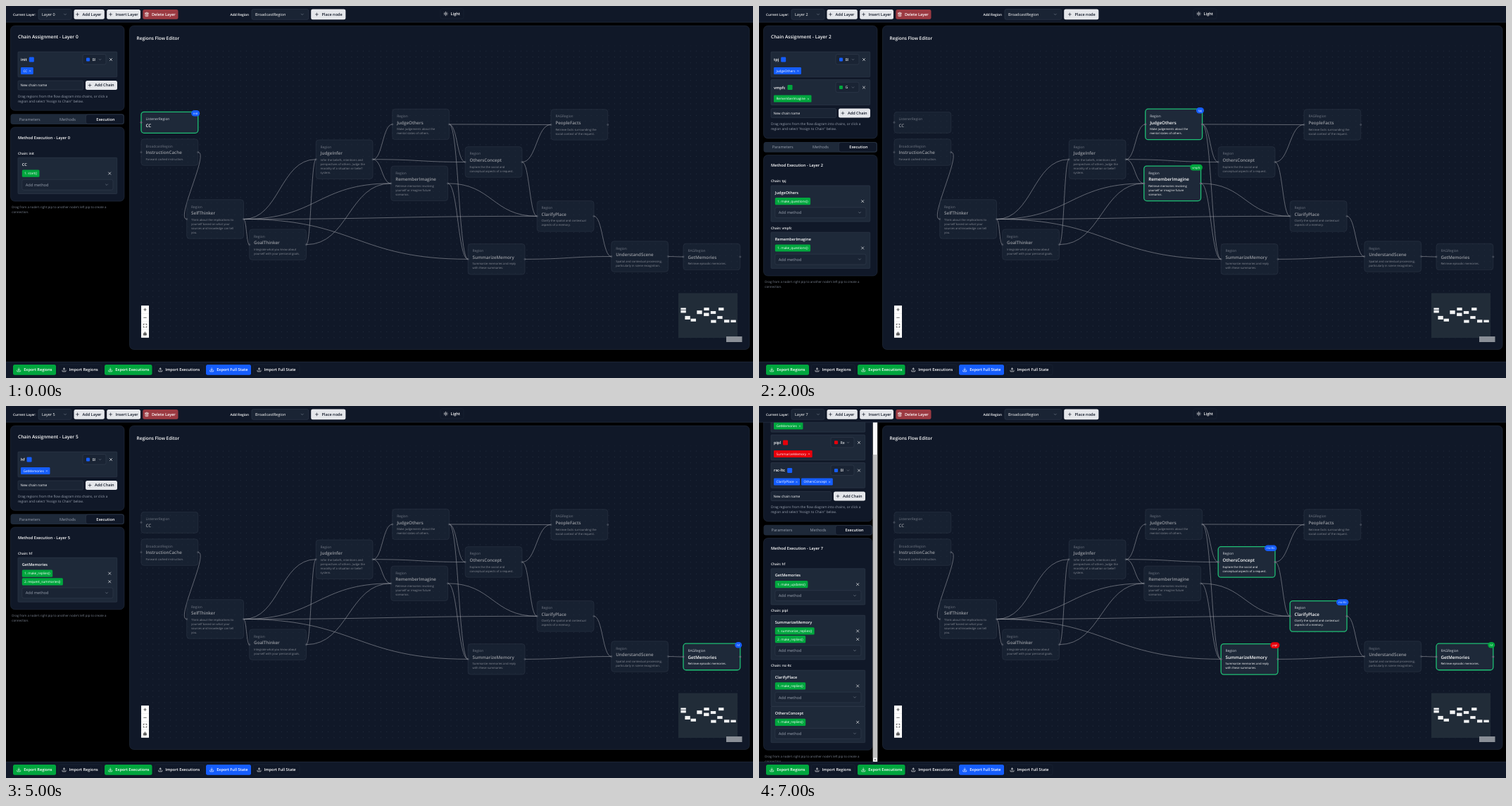
Write an HTML page that moves like this. It is 1061 by 528 pixels and loops after 8 s.

```html
<!DOCTYPE html>
<html lang="en">
<head>
<meta charset="utf-8">
<title>Regions Flow Editor</title>
<style>
html, body { margin: 0; width: 100%; height: 100%; overflow: hidden; background: #000; }
svg { display: block; }
text { font-family: "Open Sans", "Noto Sans", sans-serif; text-rendering: geometricPrecision; white-space: pre; }
</style>
</head>
<body>
<svg id="stage" width="1061" height="528" viewBox="0 0 1061 528"></svg>
<script>
const BLUE = '#155dfc', GREEN = '#00a63e', RED = '#e7000b';
const BASE = '#101828', RAISED = '#1e2939', LINE = '#364153', MUTED = '#99a1af', PALE = '#e5e7eb';
const COLOR_LABEL = { [BLUE]: 'Bl', [GREEN]: 'G', [RED]: 'Re' };

const ICONS = {
  plus: 'M5 12h14M12 5v14',
  minus: 'M5 12h14',
  close: 'M18 6 6 18M6 6l12 12',
  chevron: 'm6 9 6 6 6-6',
  down: 'M12 15V3M21 15v4a2 2 0 0 1-2 2H5a2 2 0 0 1-2-2v-4M7 10l5 5 5-5',
  up: 'M12 3v12M17 8l-5-5-5 5M21 15v4a2 2 0 0 1-2 2H5a2 2 0 0 1-2-2v-4',
  trash: 'M3 6h18M19 6v14a2 2 0 0 1-2 2H7a2 2 0 0 1-2-2V6M8 6V4a2 2 0 0 1 2-2h4a2 2 0 0 1 2 2v2M10 11v6M14 11v6',
  sun: 'M8 12a4 4 0 1 0 8 0a4 4 0 1 0-8 0M12 2v2M12 20v2M5 5l1.4 1.4M17.6 17.6 19 19M2 12h2M20 12h2M6.4 17.6 5 19M19 5l-1.4 1.4',
  fit: 'M3 8V3h5M16 3h5v5M21 16v5h-5M8 21H3v-5',
  lock: 'M5 11h14v9H5zM8 11V7a4 4 0 0 1 8 0v4M7 14h10M7 17h10'
};

// name: [x, y, type, description lines]
const NODES = {
  CC: [192, 150.3, 'ListenerRegion', []],
  InstructionCache: [192, 188.8, 'BroadcastRegion', ['Forward cached instruction.']],
  SelfThinker: [256.7, 274.8, 'Region', ['Think about the implications to', 'yourself based on what your', 'sources and knowledge can tell', 'you.']],
  GoalThinker: [345.7, 316.9, 'Region', ['Integrate what you know about', 'yourself with your personal goals.']],
  JudgeInfer: [440.2, 190, 'Region', ['Infer the beliefs, intentions and', 'perspectives of others. Judge the', 'morality of a situation or belief', 'system.']],
  JudgeOthers: [548.8, 146.2, 'Region', ['Make judgements about the', 'mental states of others.']],
  RememberImagine: [546.8, 227.1, 'Region', ['Retrieve memories involving', 'yourself or imagine future', 'scenarios.']],
  OthersConcept: [652.2, 199.7, 'Region', ['Explore the the social and', 'conceptual aspects of a request.']],
  PeopleFacts: [774, 146.7, 'RAGRegion', ['Retrieve facts surrounding the', 'social context of the request.']],
  ClarifyPlace: [754.2, 276.6, 'Region', ['Clarify the spatial and contextual', 'aspects of a memory.']],
  SummarizeMemory: [656.2, 337.6, 'Region', ['Summarize memories and reply', 'with these summaries.']],
  UnderstandScene: [859.8, 333.8, 'Region', ['Spatial and contextual processing,', 'particularly in scene recognition.']],
  GetMemories: [962, 337.2, 'RAGRegion', ['Retrieve episodic memories.']]
};

const EDGES = {
  InstructionCache: ['SelfThinker'],
  SelfThinker: ['JudgeInfer', 'RememberImagine', 'ClarifyPlace', 'SummarizeMemory', 'GoalThinker'],
  GoalThinker: ['JudgeInfer', 'RememberImagine'],
  JudgeInfer: ['JudgeOthers', 'OthersConcept', 'RememberImagine'],
  JudgeOthers: ['PeopleFacts', 'OthersConcept', 'SummarizeMemory'],
  RememberImagine: ['ClarifyPlace', 'SummarizeMemory'],
  OthersConcept: ['PeopleFacts', 'ClarifyPlace'],
  ClarifyPlace: ['UnderstandScene'],
  SummarizeMemory: ['UnderstandScene'],
  UnderstandScene: ['GetMemories']
};

// each layer: chains of [name, colour, { region: methods }]
const ask = ['make_questions'], answer = ['make_replies'], lookUp = ['make_replies', 'request_summaries'];
const LAYERS = [
  [['init', BLUE, { CC: ['start'] }]],
  [['questions_forward', BLUE, { SelfThinker: ask, GoalThinker: ask, JudgeInfer: ask }]],
  [['tpj', BLUE, { JudgeOthers: ask }], ['vmpfc', GREEN, { RememberImagine: ask }]],
  [['ltc', BLUE, { OthersConcept: ask }], ['pipl', GREEN, { SummarizeMemory: ask }]],
  [['rsc', BLUE, { ClarifyPlace: ask }], ['tempp', GREEN, { PeopleFacts: lookUp }]],
  [['hf', BLUE, { GetMemories: lookUp }]],
  [['phc', BLUE, { UnderstandScene: answer }]],
  [['hf', GREEN, { GetMemories: ['make_updates'] }],
   ['pipl', RED, { SummarizeMemory: ['summarize_replies', 'make_replies'] }],
   ['rsc-ltc', BLUE, { ClarifyPlace: answer, OthersConcept: answer }]]
];

const pen = document.createElement('canvas').getContext('2d');
function textWidth(s, size, weight = 400) {
  pen.font = `${weight} ${size * 10}px "Open Sans", "Noto Sans", sans-serif`;
  return pen.measureText(s).width / 10;
}

// text is placed by the middle of its capitals
const text = (x, mid, s, size, fill = '#fff', weight = 400, anchor = 'start') =>
  `<text x="${x}" y="${mid + size * 0.357}" font-size="${size}" fill="${fill}" font-weight="${weight}" text-anchor="${anchor}">${s}</text>`;
const rect = (x, y, w, h, fill, r = 0, stroke = 'none', sw = 0.5) =>
  `<rect x="${x}" y="${y}" width="${w}" height="${h}" rx="${r}" fill="${fill}" stroke="${stroke}" stroke-width="${sw}"/>`;
const icon = (name, cx, cy, size = 6.6, color = '#fff') =>
  `<path d="${ICONS[name]}" transform="translate(${cx - size / 2} ${cy - size / 2}) scale(${size / 24})" fill="none" stroke="${color}" stroke-width="2.4" stroke-linecap="round" stroke-linejoin="round"/>`;

function button(x, y, w, h, iconName, label, bg, fg = '#fff', gap = 15.2) {
  return rect(x, y, w, h, bg, 2.5, bg === BASE ? RAISED : 'none') +
    icon(iconName, x + gap - 7, y + h / 2, 6.6, fg) + text(x + gap, y + h / 2, label, 5.6, fg, 600);
}
function select(x, y, w, h, label, size = 5.5, fill = '#fff') {
  return rect(x, y, w, h, '#1a2434', 2.5, LINE) + text(x + 5, y + h / 2, label, size, fill) +
    icon('chevron', x + w - 9, y + h / 2, 6, '#7d8694');
}

const nodeHeight = lines => lines.length ? 31.6 + 5.95 * lines.length : 30;
function ports(name) {
  const [x, y, , lines] = NODES[name];
  return [x, x + 80.8, y + nodeHeight(lines) / 2];
}

function edge(from, to) {
  const [, x1, y1] = ports(from), [x2, , y2] = ports(to);
  const dx = x2 - x1, reach = dx >= 0 ? dx / 2 : 4.05 * Math.sqrt(-dx);
  return `<path d="M${x1} ${y1}C${x1 + reach} ${y1} ${x2 - reach} ${y2} ${x2} ${y2}" fill="none" stroke="#a6a8ae" stroke-width=".55"/>`;
}

function node(name, chain) {
  const [x, y, type, lines] = NODES[name], h = nodeHeight(lines), [left, right, mid] = ports(name);
  const dot = cx => `<circle cx="${cx}" cy="${mid}" r="1.2" fill="#59616e" stroke="#a0a5ad" stroke-width=".3"/>`;
  let out = rect(x, y, 80.8, h, RAISED, 4, chain ? '#1fbf75' : '#465061', chain ? 1.3 : 0.5) +
    text(x + 6.4, y + 10, type, 4.9, chain ? '#d1d5dc' : '#b6bcc6') +
    text(x + 6.4, y + 19.1, name, 6.25, '#fff', 600) +
    lines.map((s, i) => text(x + 6.4, y + 28.4 + 6 * i, s, 4.15, chain ? '#fff' : '#e0e3e8')).join('') +
    dot(left) + (name === 'CC' ? '' : dot(right));
  if (chain) {
    const w = textWidth(chain[0], 4.1) + 6;
    out += rect(x + 83.2 - w, y - 2.3, w, 8.6, chain[1], 4.3) + text(x + 83.2 - w / 2, y + 2, chain[0], 4.1, '#fff', 400, 'middle');
  }
  return `<g opacity="${chain ? 1 : 0.57}">${out}</g>`;
}

function miniMap() {
  const marks = Object.values(NODES).map(([x, y, , lines]) =>
    rect(958.4 + (x - 192) * 0.0922, 428.5 + (y - 150) * 0.0915, 7.4, nodeHeight(lines) * 0.092, '#f1f2f3'));
  return rect(955, 407.5, 84, 63.5, '#212c38') + marks.join('') + rect(1023, 469, 22.5, 8, '#8a8f97');
}

function flow(layer) {
  const owner = {};
  for (const chain of LAYERS[layer]) for (const region in chain[2]) owner[region] = chain;
  return rect(175.5, 28, 880.5, 459.5, BASE, 6, '#2a3648') +
    text(185.6, 45.3, 'Regions Flow Editor', 6.45, '#fff', 600) +
    rect(186, 56, 860, 421, 'url(#dots)') +
    Object.keys(EDGES).map(from => EDGES[from].map(to => edge(from, to)).join('')).join('') +
    Object.keys(NODES).map(name => node(name, owner[name])).join('') +
    rect(192, 425.2, 11, 45.6, '#fefefe') +
    ['plus', 'minus', 'fit', 'lock'].map((n, i) => icon(n, 197.5, 430.9 + 11.4 * i, 6.2, '#111') +
      (i ? rect(192, 425 + 11.4 * i, 11, 0.4, '#ddd') : '')).join('') +
    miniMap();
}

function chainBox(y, right, [name, color, regions]) {
  const swatch = 24 + textWidth(name, 5.56, 600);
  let out = rect(17, y, right - 27.3, 35.8, RAISED, 1, LINE) +
    text(21, y + 11, name, 5.56, '#fff', 600) + rect(swatch, y + 7.5, 7, 7, color, 1.2) +
    rect(right - 59, y + 3.5, 33, 14.5, '#1a2434', 2.5, LINE) + rect(right - 54, y + 8.4, 5, 5, color, 1) +
    text(right - 45.5, y + 11, COLOR_LABEL[color], 5.3) + icon('chevron', right - 34.5, y + 11, 5.5, '#7d8694') +
    icon('close', right - 19, y + 11, 6.4);
  let x = 21;
  for (const region in regions) {
    const w = textWidth(region, 4.65) + 12;
    out += rect(x, y + 22, w, 10, color, 1.2) + text(x + 3.5, y + 27, region, 4.65) + icon('close', x + w - 4.6, y + 27.3, 3.6);
    x += w + 2;
  }
  return out;
}

function sidebar(layer) {
  const chains = LAYERS[layer], last = layer === 7;
  const right = last ? 161 : 168, w = right - 6.5, shift = 39.6 * (chains.length - 1);
  let out = rect(6.5, 28, w, 120.3 + shift, BASE, 6, '#2a3648') +
    text(17, 43.5, 'Chain Assignment - Layer ' + layer, 6.58, '#fff', 600) +
    chains.map((c, i) => chainBox(65 + 39.6 * i, right, c)).join('');

  let y = shift;
  out += rect(17, y + 106, right - 75.5, 13, '#1a2434', 1.5, LINE) + text(20.6, y + 112.6, 'New chain name', 4.85) +
    button(right - 55, y + 106, 45, 13, 'plus', 'Add Chain', PALE, '#111827', 13) +
    text(17, y + 128, 'Drag regions from the flow diagram into chains, or click a', 4.82, MUTED) +
    text(17, y + 135, 'region and select "Assign to Chain" below.', 4.82, MUTED) +
    rect(6.5, y + 153.3, w, 14.8, RAISED, 3.5) + rect(right - w / 3 - 0.8, y + 154, w / 3, 13.4, BASE, 3, LINE) +
    ['Parameters', 'Methods', 'Execution'].map((s, i) =>
      text(6.8 + w * (i + 0.5) / 3, y + 160.8, s, 5.55, i > 1 ? '#fff' : MUTED, i > 1 ? 600 : 400, 'middle')).join('');

  const top = y + 172;
  let body = text(17, y + 186.5, 'Method Execution - Layer ' + layer, 5.67, '#fff', 600);
  y += 209;
  for (const [name, , regions] of chains) {
    body += text(17, y, 'Chain: ' + name, 4.72, '#fff', 600);
    y += 6.3;
    for (const region in regions) {
      const methods = regions[region], extra = 11.7 * (methods.length - 1);
      body += rect(17, y, right - 27.3, 51.2 + extra, RAISED, 1, LINE) + text(22.8, y + 9.7, region, 5.56, '#fff', 600);
      methods.forEach((m, i) => {
        const label = `${i + 1}. ${m}()`, mid = y + 22.3 + 11.7 * i;
        body += rect(22.8, mid - 5.1, textWidth(label, 4.72) + 6.6, 10.2, GREEN, 1.5) + text(26.1, mid, label, 4.72) +
          icon('close', right - 20.8, mid, 6.4);
      });
      body += select(22.8, y + 31 + extra, right - 38.8, 14.8, 'Add method', 5.65, MUTED);
      y += 51.4 + extra;
    }
    y += 8.6;
  }
  out += rect(6.5, top, w, y + 1.8 - top, BASE, 6, '#2a3648') + body +
    text(8.3, y + 10.5, "Drag from a node's right pip to another node's left pip to create a", 4.45, '#7b8391') +
    text(8.3, y + 17.6, 'connection.', 4.45, '#7b8391');

  const bar = rect(161.8, 23, 6.4, 482, '#fafafa') + rect(161.8, 69, 6.4, 430.5, '#c1c1c1') +
    '<path d="M163.4 501.4h3.2l-1.6 2z" fill="#555"/>';
  return `<g transform="translate(0 ${last ? -63.7 : 0})">${out}</g>` + (last ? bar : '');
}

function bars(layer) {
  const header = rect(0, 0, 1061, 23, BASE) + rect(0, 22.8, 1061, 0.6, '#2a3648') +
    text(10, 12.2, 'Current Layer:', 4.7, '#fff', 600) + select(46, 4.5, 47, 14.8, 'Layer ' + layer) +
    button(96.5, 5, 43.3, 13.8, 'plus', 'Add Layer', PALE, '#111827', 12) +
    button(143.2, 5, 47.8, 13.8, 'plus', 'Insert Layer', PALE, '#111827', 12.4) +
    button(194.3, 5, 50.2, 13.8, 'trash', 'Delete Layer', '#9c3a42', '#fff', 12.6) +
    text(318.6, 12.2, 'Add Region', 4.85, '#fff', 600) + select(349, 4.5, 80.8, 14.8, 'BroadcastRegion') +
    button(433.2, 4.5, 49.2, 14.8, 'plus', 'Place node', PALE, '#111827') +
    button(617, 4, 33, 14, 'sun', 'Light', BASE, '#fff', 14.6);
  const footer = rect(0, 505, 1061, 23, BASE) + rect(0, 504.8, 1061, 0.6, '#2a3648') +
    [[10, 61, 'Regions', GREEN], [74.3, 61.7, 'Regions', BASE], [140, 67.5, 'Executions', GREEN],
     [211, 70, 'Executions', BASE], [284, 64, 'Full State', BLUE], [351.3, 65.7, 'Full State', BASE]]
      .map(([x, w, s, bg], i) => button(x, 509, w, 14.8, i % 2 ? 'up' : 'down', (i % 2 ? 'Import ' : 'Export ') + s, bg)).join('');
  return header + footer;
}

const stage = document.getElementById('stage');
const dots = `<defs><pattern id="dots" x="188" y="60" width="8.3" height="8.3" patternUnits="userSpaceOnUse">
  <circle cx="4" cy="4" r=".45" fill="#3a4658"/></pattern></defs>`;
let shown = -1;

function tick() {
  const layer = Math.floor(performance.now() / 1000) % LAYERS.length;
  if (layer !== shown) {
    shown = layer;
    stage.innerHTML = dots + rect(0, 0, 1061, 528, '#000') + flow(layer) + sidebar(layer) + bars(layer);
  }
  requestAnimationFrame(tick);
}
tick();
</script>
</body>
</html>
```
